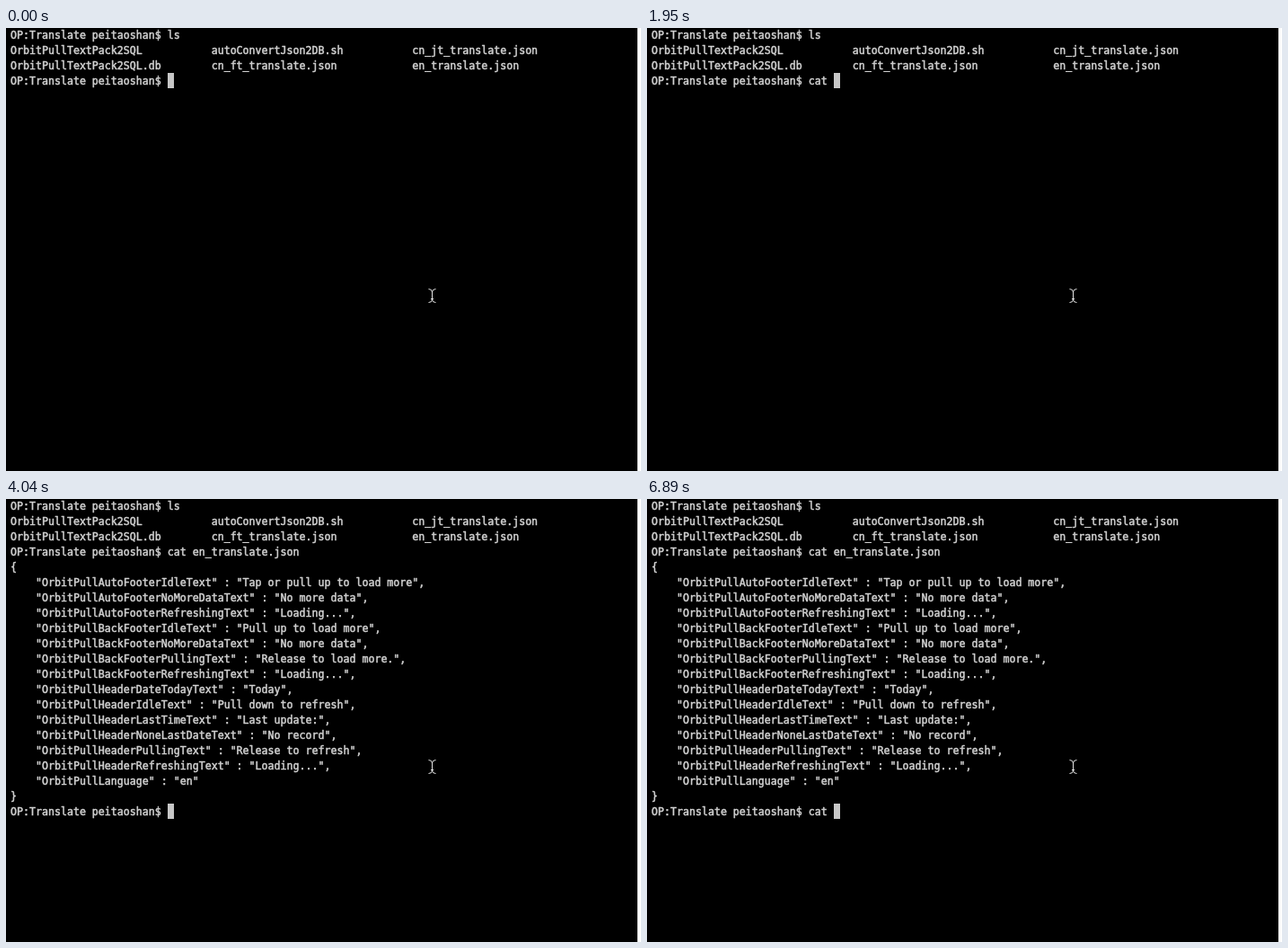
Animation of 707x493 px, one loop 8000 ms. Source, as an HTML page with a canvas:

```html
<!DOCTYPE html>
<html lang="en">
<head>
<meta charset="utf-8">
<title>Terminal</title>
<style>
  html, body { margin: 0; width: 100%; height: 100%; overflow: hidden; background: #fff; }
  canvas { display: block; }
</style>
</head>
<body>
<canvas id="stage" width="707" height="493"></canvas>
<script>
const ctx = document.getElementById('stage').getContext('2d');
const LOOP = 8000, CELL = 7, LINE = 17, LEFT = 5, TOP = -1, BASELINE = 13;
const TEXT_COLOR = '#d2d2d2', CURSOR_COLOR = '#c7c7c7';

const PROMPT = 'OP:Translate peitaoshan$ ';
const row = (...cells) => cells.map(cell => cell.padEnd(32)).join('');
const LISTING = [
  PROMPT + 'ls',
  row('OrbitPullTextPack2SQL', 'autoConvertJson2DB.sh', 'cn_jt_translate.json'),
  row('OrbitPullTextPack2SQL.db', 'cn_ft_translate.json', 'en_translate.json'),
];

const PHRASES = {
  AutoFooterIdleText: 'Tap or pull up to load more',
  AutoFooterNoMoreDataText: 'No more data',
  AutoFooterRefreshingText: 'Loading...',
  BackFooterIdleText: 'Pull up to load more',
  BackFooterNoMoreDataText: 'No more data',
  BackFooterPullingText: 'Release to load more.',
  BackFooterRefreshingText: 'Loading...',
  HeaderDateTodayText: 'Today',
  HeaderIdleText: 'Pull down to refresh',
  HeaderLastTimeText: 'Last update:',
  HeaderNoneLastDateText: 'No record',
  HeaderPullingText: 'Release to refresh',
  HeaderRefreshingText: 'Loading...',
  Language: 'en',
};
const entries = Object.entries(PHRASES)
  .map(([key, value]) => `    "OrbitPull${key}" : "${value}"`)
  .join(',\n').split('\n');

const COMMAND = 'cat en_translate.json ';
const OUTPUT = [PROMPT + COMMAND, '{', ...entries, '}'];
const OUTPUT_TIME = 4040;

// [time, number of command characters typed]
const KEYSTROKES = [
  [0, 0], [1350, 1], [1500, 2], [1800, 3], [1950, 4], [3290, 6], [3590, COMMAND.length],
  [OUTPUT_TIME, 0], [6290, 1], [6590, 2], [6740, 3], [6890, 4],
];

function drawPointer() {
  ctx.strokeStyle = '#e4e4e4';
  ctx.lineWidth = 1;
  ctx.stroke(new Path2D(
    'M470.5 290.5 Q474.5 290.5 474.5 294 Q474.5 290.5 478.5 290.5' +
    'M474.5 293 V303 M473 301.5 H476' +
    'M470.5 305.5 Q474.5 305.5 474.5 302 Q474.5 305.5 478.5 305.5'));
}

function draw(time) {
  const typed = KEYSTROKES.findLast(([start]) => start <= time)[1];
  const lines = [
    ...LISTING,
    ...(time >= OUTPUT_TIME ? OUTPUT : []),
    PROMPT + COMMAND.slice(0, typed),
  ];

  ctx.fillStyle = '#fff';
  ctx.fillRect(0, 0, 707, 493);
  ctx.fillStyle = '#000';
  ctx.fillRect(0, 0, 703, 493);

  // The font size gives a character advance of one cell.
  ctx.font = '11.627px "DejaVu Sans Mono", monospace';
  ctx.fillStyle = ctx.strokeStyle = TEXT_COLOR;
  ctx.lineWidth = 0.5;
  ctx.lineJoin = 'round';
  lines.forEach((line, i) => {
    const y = TOP + i * LINE + BASELINE;
    ctx.fillText(line, LEFT, y);
    ctx.strokeText(line, LEFT, y);
  });

  const column = PROMPT.length + typed;
  ctx.fillStyle = CURSOR_COLOR;
  ctx.fillRect(LEFT + column * CELL, TOP + (lines.length - 1) * LINE, CELL, LINE);
  drawPointer();
}

const startTime = performance.now();
function tick() {
  draw((performance.now() - startTime) % LOOP);
  requestAnimationFrame(tick);
}
tick();
</script>
</body>
</html>
```
